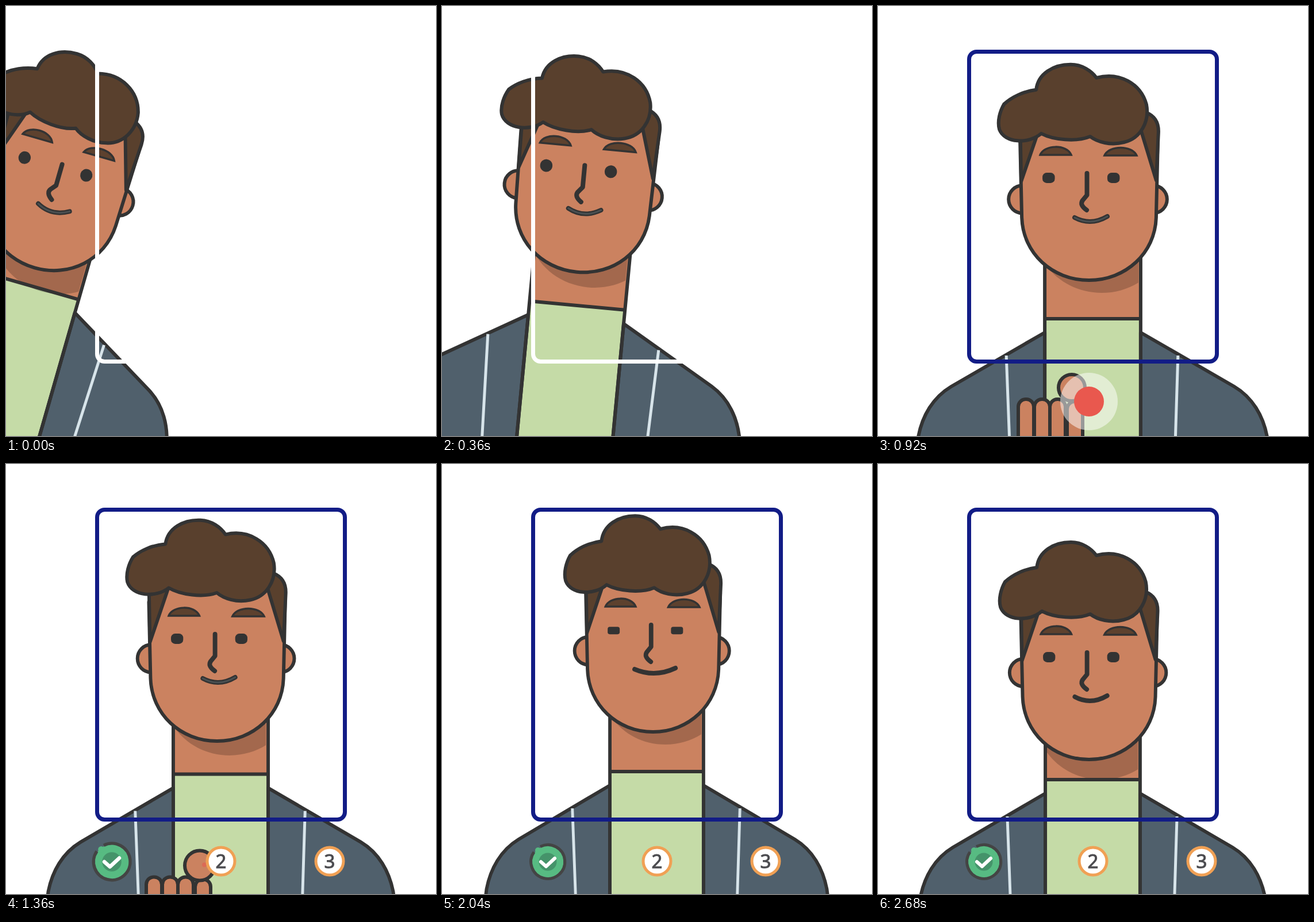
Animation, 748 px wide and 748 px high, one loop 2720 ms. Source, as an HTML page:

```html
<!DOCTYPE html>
<html lang="en">
<head>
<meta charset="utf-8">
<title>Face scan</title>
<style>
  html, body { margin: 0; height: 100%; overflow: hidden; background: #fff; }
  svg { display: block; width: 100vw; height: 100vh; }
  .ink { stroke: #333; stroke-width: 6; stroke-linejoin: round; }
  .line { fill: none; stroke: #333; stroke-width: 8; stroke-linecap: round; stroke-linejoin: round; }
  .skin { fill: #cb8260; }
  .hair { fill: #59402d; }
  .coat { fill: #50606c; }
  .brow { fill: #5d412e; stroke: #333; stroke-width: 3.5; }
  .stripe { stroke: #d7e4ea; stroke-width: 5; }
  .badge circle { fill: #fff; stroke: #f0a054; stroke-width: 5; }
  text { font: 500 33px "Noto Sans", "Open Sans", sans-serif; fill: #4c4c50; stroke: #4c4c50; text-anchor: middle; }
</style>
</head>
<body>
<svg viewBox="0 0 748 748">
  <defs>
    <clipPath id="neck"><rect x="293" y="400" width="160" height="300"/></clipPath>
    <path id="jaw" d="M262 200L247 240L250 373C252 435 303 482 367 482C431 482 482 435 484 373L487 240L472 200Z"/>
    <rect id="finger" y="712" width="27" height="200" rx="13"/>
  </defs>

  <g id="figure">
    <g id="body">
      <rect class="skin" x="290" y="420" width="166" height="126"/>
      <rect x="290" y="546" width="166" height="700" fill="#c5dba7"/>
      <g clip-path="url(#neck)"><use id="shadow" href="#jaw" fill-opacity=".2"/></g>
      <path class="ink" d="M290 546H457"/>
      <path class="coat ink" d="M290 570L127 664C95 683 77 715 70 750L57 850V1250H290Z"/>
      <path class="coat ink" d="M457 570L620 664C652 683 670 715 677 750L690 850V1250H457Z"/>
      <path class="stripe" d="M223 610L234 900M522 610L513 900"/>
      <path class="ink" d="M290 420V1250M457 420V1250"/>
    </g>
    <g id="ears" class="skin ink">
      <circle cx="251" cy="342" r="24"/>
      <circle cx="479" cy="342" r="24"/>
    </g>
    <g id="face">
      <use href="#jaw" class="skin ink"/>
      <path class="hair ink" d="M247 205H285L249 310Z"/>
      <path class="hair ink" d="M448 190L484 308L488 225Q489 199 466 190Z"/>
      <path class="brow" d="M282 264C289 246 328 245 336 264ZM394 265C402 247 442 247 450 265Z"/>
      <g id="eyes" fill="#333">
        <rect x="286" width="21.5"/><rect x="399" width="21.5"/>
      </g>
      <g id="lids" class="skin">
        <ellipse cx="296.7" cy="312" rx="5" ry="3"/><ellipse cx="409.7" cy="312" rx="5" ry="3"/>
      </g>
      <path class="line" d="M363.500 296V334L356 343Q350 351 363 360"/>
      <path class="line" id="mouth"/>
      <path class="line" id="shine" style="stroke:#4a5052;stroke-width:3"/>
    </g>
    <path id="hair" class="hair ink" d="M284 229C262 248 220 246 211 222C207 208 212 190 219 178C232 166 252 156 275 153C278 125 305 109 335 109C355 109 371 120 380 132C420 121 457 142 467 178C473 208 457 237 428 244C405 250 382 244 369 234C345 244 305 240 284 229Z"/>
  </g>

  <rect id="frame" x="158.500" y="79.500" width="431" height="539" rx="13" fill="none" stroke-width="7"/>

  <g id="hand" class="skin ink">
    <use href="#finger" x="329" y="4"/>
    <circle id="tip" cx="337" cy="692"/>
    <use href="#finger" x="244"/><use href="#finger" x="272"/><use href="#finger" x="299"/>
  </g>

  <g id="button">
    <circle id="halo" r="50" fill="#fff"/>
    <circle r="26" fill="#e9584e"/>
  </g>

  <g id="done">
    <circle r="28" fill="#57bb82"/>
    <path d="M-13 -26.500A29.500 29.500 0 1 1 -24 -17" fill="none" stroke="#444" stroke-width="5"/>
    <circle cx="-17" cy="-20" r="5" fill="#57bb82"/>
    <circle r="15.500" fill="#45936a"/>
    <path d="M-12 0L-3 8L12 -6" fill="none" stroke="#fff" stroke-width="6" stroke-linecap="round" stroke-linejoin="round"/>
  </g>
  <g class="badge" id="two"><circle r="24"/><text y="11.500">2</text></g>
  <g class="badge" id="three"><circle r="24"/><text y="11.500">3</text></g>
</svg>

<script>
const LOOP = 2720;
const $ = id => document.getElementById(id);
const set = (id, attrs) => { for (const k in attrs) $(id).setAttribute(k, attrs[k]); };
const move = (id, transform) => set(id, { transform });

function draw(t) {
  // Smooth step from 0 to 1 between two times.
  const ease = (from, to) => {
    const p = Math.min(1, Math.max(0, (t - from) / (to - from)));
    return p * p * (3 - 2 * p);
  };
  // Soft pulse around a time, wrapping over the loop.
  const bump = (center, reach) => {
    const gap = Math.abs(t - center), d = Math.min(gap, LOOP - gap) / reach;
    return d < 1 ? Math.cos(d * Math.PI / 2) ** 2 : 0;
  };

  const rest = 1 - ease(0, 640);
  const width = 1 - .025 * bump(2040, 1300);
  move("figure", `translate(${-424 * rest} ${-72 * rest ** 1.1}) rotate(${16 * rest ** 1.2} 373 900)
    translate(373 0) scale(${width} 1) translate(-373 0)`);

  const nod = ease(2040, 2640) + 1 - ease(0, 500);
  const lift = bump(920, 400), lag = bump(1500, 800);
  const body = -11 * ease(500, 2040) + 14 * ease(2040, 2680);
  const face = 32 * nod - 5 * lift - 16 * bump(2040, 420);
  const drop = face - body;
  move("body", `translate(0 ${body})`);
  move("shadow", `translate(22 ${drop + 22 + Math.max(0, drop) * .45})`);
  move("ears", `translate(0 ${face - 11 * nod - 4 * lag})`);
  move("face", `translate(0 ${face})`);
  move("hair", `translate(0 ${face - 5 * nod - 12 * lag}) rotate(${2.4 * bump(1360, 500)} 340 180)`);

  const open = 22 - 4 * ease(440, 640) - 9 * bump(640, 160) - 5 * bump(2040, 120);
  for (const eye of $("eyes").children) {
    eye.setAttribute("y", 304 + (18 - open) / 3 - open / 2);
    eye.setAttribute("height", open);
    eye.setAttribute("rx", open * open / 44);
  }
  set("lids", { opacity: open < 11 ? 1 : 0 });

  const grin = 8 * bump(2040, 350), d = `M${342 - grin} 373Q370 388 ${399 + grin} 371`;
  set("mouth", { d });
  set("shine", { d, opacity: t < 1700 ? 1 : 0 });

  const mix = (a, b) => a + (b - a) * ease(440, 560);
  set("frame", { stroke: `rgb(${mix(255, 18)},${mix(255, 28)},${mix(255, 134)})` });

  move("hand", `translate(0 ${100 - 100 * ease(480, 660) - 28 * lift + 110 * ease(1320, 1600)})`);
  set("tip", { r: 23 + 3 * ease(920, 1360) });
  const press = ease(560, 640) - ease(1120, 1440), near = 1 - ease(1120, 1440);
  move("button", `translate(${341 + 26 * near} ${699 - 11 * near}) scale(${press})`);
  set("button", { opacity: Math.min(1, .4 + press) });
  set("halo", { opacity: Math.max(0, press - .5) });

  const pop = ease(1160, 1280);
  move("done", `translate(184 692) scale(${ease(1200, 1320) + .08 * bump(1360, 100)})`);
  move("two", `translate(374 691) scale(${pop})`);
  move("three", `translate(563 691) scale(${pop})`);
}

const start = performance.now();
function tick() {
  draw((performance.now() - start) % LOOP);
  requestAnimationFrame(tick);
}
tick();
</script>
</body>
</html>
```
